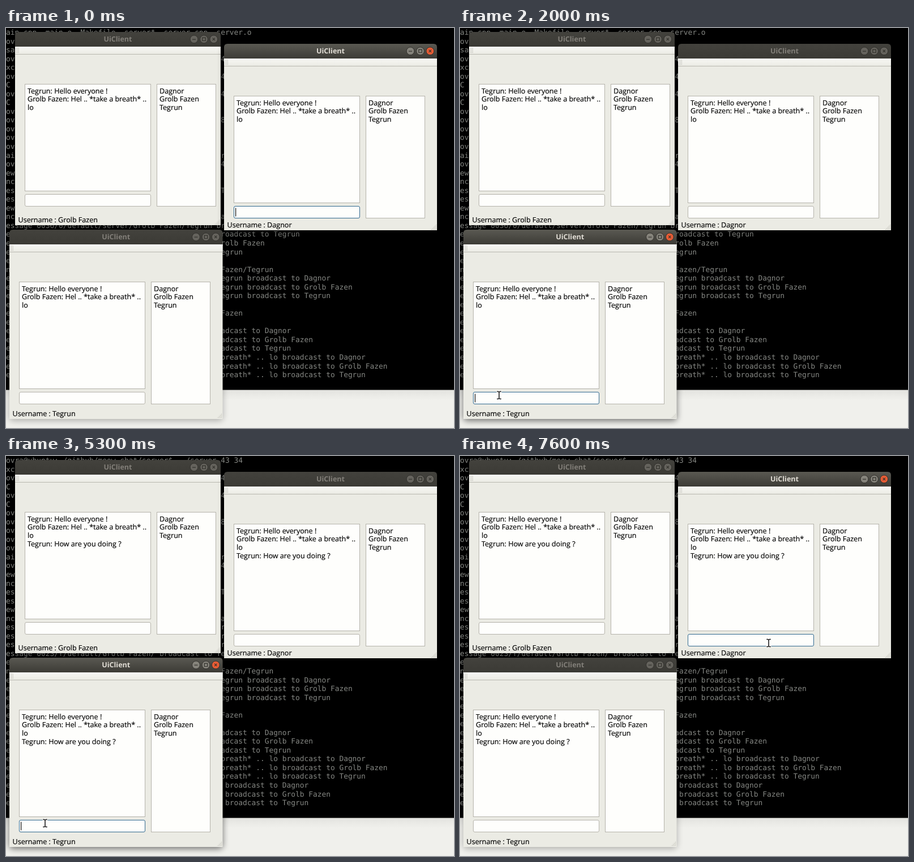
Animation of 791x708 px, one loop 8000 ms. Source, as an HTML page:

```html
<!DOCTYPE html>
<html lang="en">
<head>
<meta charset="utf-8">
<title>Chat clients</title>
<style>
html, body { margin: 0; width: 100%; height: 100%; overflow: hidden; background: #f0f0ec; }
svg { display: block; width: 791px; height: 708px; }
text { white-space: pre; text-rendering: geometricPrecision; }
.ui { font: 12.57px "Open Sans", "Noto Sans", sans-serif; }
.ui text { fill: #0a0a0a; stroke: #0a0a0a; stroke-width: .22; }
.ui .title { font-weight: 700; text-anchor: middle; fill: #827f79; stroke: none; }
.ui .title.active { fill: #e2ded6; }
.term { font: 12.87px "DejaVu Sans Mono", monospace; fill: #858783; }
.box { fill: #fefefc; stroke: #b5b3ab; }
</style>
</head>
<body>
<svg id="stage" viewBox="0 0 791 708">
  <defs>
    <linearGradient id="on" x2="0" y2="1"><stop stop-color="#5a5952"/><stop offset="1" stop-color="#3c3b36"/></linearGradient>
    <linearGradient id="off" x2="0" y2="1"><stop stop-color="#43423d"/><stop offset="1" stop-color="#3b3a35"/></linearGradient>
    <linearGradient id="bar" x2="0" y2="1"><stop stop-color="#f8f8f5"/><stop offset="1" stop-color="#ebebe4"/></linearGradient>
    <linearGradient id="edge" x2="0" y2="1"><stop stop-color="#e3e3df"/><stop offset="1" stop-color="#f0f0ec"/></linearGradient>
    <filter id="blur" x="-15%" y="-15%" width="130%" height="130%"><feGaussianBlur stdDeviation="6"/></filter>
    <pattern id="dots" width="2" height="2" patternUnits="userSpaceOnUse"><rect width="1" height="1" fill="#b9b8b0"/></pattern>
  </defs>
  <rect width="791" height="708" fill="#f0f0ec"/>
  <rect y="640" width="791" height="18" fill="url(#edge)"/>
  <rect width="791" height="640.6" fill="#000"/>
</svg>
<script>
const LOOP = 8000, CELL = 49, ROWS = 40;
const A = 'Tegrun', B = 'Grolb Fazen', C = 'Dagnor', USERS = [C, B, A];
const CHAT = [A + ': Hello everyone !', B + ': Hel .. *take a breath* ..', 'lo', A + ': How are you doing ?'];
const stage = document.getElementById('stage');

function el(parent, tag, attrs = {}, content) {
  const node = document.createElementNS('http://www.w3.org/2000/svg', tag);
  for (const k in attrs) node.setAttribute(k, attrs[k]);
  if (content !== undefined) node.textContent = content;
  parent.appendChild(node);
  return node;
}
const show = (node, on) => node.setAttribute('visibility', on ? 'visible' : 'hidden');

// Terminal log: start of the row, then what follows column 49
const prompt = 'ovra@ubuntu:~/github/meow-chat/server$ ';
const files = 'ain.cpp  main.o  Makefile  server*  server.cpp  server.o';
const run = [prompt + ' ./server', '43 34'];
const toAll = head => USERS.map(u => ['essage', head + 'broadcast to ' + u]);
const log = [
  [files, ''], [prompt, ''], ['sage: server', ''], run, ['xception', ''], run,
  ['C', ''], run, ['C', ''], [prompt, ''], [prompt, '8'], [prompt, ''], [prompt, ''], [prompt, ''],
  ['ain.cpp', 'r'], run, ['ewUser', ''], ['nce', ''], ['essage', A], ['essage', ''],
  ['ewUser', ''], ['nce', 'a'],
  [`essage 0036/0/default/server/${B}/${A} b`, 'roadcast to ' + C],
  ['essage', 'roadcast to ' + A], ['essage', B.slice(1)],
  [`essage 0023/f/default/${B}/ broadcast to ${A[0]}`, A.slice(1)],
  ['essage', ''], ['newUser', B.slice(6) + '/' + A],
  ...toAll(A.slice(1) + ' '),
  ['essage', ''], ['essage', B.slice(6)], ['essage', ''],
  ...USERS.map(u => ['essage', 'adcast to ' + u]),
  ...toAll('breath* .. lo '), ...toAll(' ')
].map(([a, b]) => a.padEnd(CELL) + b);
const term = el(stage, 'g', { class: 'term' });
const rows = Array.from({ length: ROWS }, (_, i) => el(term, 'text', { x: 0, y: 12 + 15.54 * i }));
let shift = -1;
function scrollTo(n) {
  if (n === shift) return;
  shift = n;
  rows.forEach((r, i) => r.textContent = log[i + n]);
}

function makeWindow(x, y, w, h, user) {
  const shadow = el(stage, 'rect', { x, y: y + 3, width: w, height: h, rx: 5, filter: 'url(#blur)' });
  const g = el(stage, 'g', { transform: `translate(${x} ${y})`, class: 'ui' });
  const label = (tx, ty, s) => el(g, 'text', { x: tx, y: ty }, s);
  const box = (bx, by, bw, bh, rx) =>
    el(g, 'rect', { x: bx, y: by, width: bw, height: bh, rx, class: 'box' });

  el(g, 'rect', { y: 20, width: w, height: h - 20, fill: '#ebebe4' });
  const bar = el(g, 'path', { d: `M0 26V6Q0 0 6 0H${w - 6}Q${w} 0 ${w} 6V26Z` });
  const title = el(g, 'text', { x: w / 2, y: 17, class: 'title' }, 'UiClient');
  const buttons = [47, 29.5, 12.2].map((d, i) => {
    const b = el(g, 'g', { transform: `translate(${w - d} 12.8)` });
    const disc = el(b, 'circle', { r: 6.9, stroke: '#32312d' });
    el(b, 'path', {
      d: ['M-3 .3H3', 'M-2.7 -2.7H2.7V2.7H-2.7Z', 'M-2.1 -2.1L2.1 2.1M2.1 -2.1L-2.1 2.1'][i],
      fill: 'none', stroke: '#31302b', 'stroke-width': 1.2
    });
    return disc;
  });

  el(g, 'rect', { y: 26, width: w, height: 13, fill: 'url(#bar)' });
  el(g, 'rect', { y: 39, width: w, height: 1, fill: '#b9b8b0' });
  el(g, 'rect', { x: 2, y: 28, width: 5, height: 10, fill: 'url(#dots)' });
  el(g, 'path', { d: `M${w - 1} ${h - 11}V${h - 1}H${w - 11}Z`, fill: 'url(#dots)' });

  box(17.5, 92.5, 222, 189, 0);
  box(250.5, 92.5, 104, 216, 0);
  const input = box(17.5, 287.5, 222, 21, 2.5);
  const lines = CHAT.map((s, i) => label(22, 108.8 + 14.6 * i, s));
  USERS.forEach((s, i) => label(255, 108.8 + 14.6 * i, s));
  label(5.5, h - 5.2, 'Username : ' + user);
  const typed = label(20, 302.5, '');
  const caret = el(g, 'rect', { y: 290.5, width: 1.2, height: 15, fill: '#111' });

  return (active, focus, blink, text, sent) => {
    shadow.setAttribute('opacity', focus ? .55 : .28);
    bar.setAttribute('fill', active ? 'url(#on)' : 'url(#off)');
    title.classList.toggle('active', active);
    buttons.forEach((b, i) => b.setAttribute('fill', !active ? '#65635d' : i === 2 ? '#e65c35' : '#85837b'));
    input.style.stroke = focus ? '#31698f' : '';
    if (typed.textContent !== text) typed.textContent = text;
    show(caret, focus && blink);
    caret.setAttribute('x', 20 + (text ? typed.getComputedTextLength() : 0));
    show(lines[3], sent);
  };
}
const windows = [
  makeWindow(16, 7, 363, 342, B),
  makeWindow(385, 28, 376, 330, C),
  makeWindow(6, 357, 376.5, 335, A)
];

const beam = 'M-3 -6.5H-1.4L0 -5.5L1.4 -6.5H3M0 -5.5V5.5M-3 6.5H-1.4L0 5.5L1.4 6.5H3';
const pointer = el(stage, 'g', { fill: 'none', 'stroke-linecap': 'square' });
el(pointer, 'path', { d: beam, stroke: '#fff', 'stroke-width': 3 });
el(pointer, 'path', { d: beam, stroke: '#111', 'stroke-width': 1.5 });

// Value of the last [time, value] step reached
const at = (steps, t) => steps.reduce((v, s) => t >= s[0] ? s[1] : v, steps[0][1]);
const FOCUS = [[0, 1], [200, 0], [600, 2], [7000, 1]];
const ACTIVE = [[0, 1], [300, 0], [700, 2], [7100, 1]];
const BLINK = [[0, 1], [1200, 0], [1800, 1], [2300, 0], [2900, 1], [5900, 0], [6400, 1], [7600, 0]];
const PHRASE = 'How are you doing ? ';
const KEYS = [[0, 0], [3000, 1], [3200, 2], [3300, 3], [3400, 4], [3600, 6], [3700, 7], [3900, 9],
  [4100, 11], [4200, 12], [4400, 13], [4500, 15], [4700, 16], [4800, 17], [4900, 19], [5000, 20], [5200, 0]];
const PATH = [[1200, 92, 307], [1800, 69, 682], [1900, 69, 682], [2000, 69, 650], [6300, 69, 650],
  [6800, 540, 349], [6900, 540, 349], [7000, 560, 328], [7300, 560, 328], [7600, 545, 331], [LOOP, 545, 331]];

function pointerAt(t) {
  const i = Math.max(1, PATH.findIndex(p => p[0] >= t));
  const [t0, x0, y0] = PATH[i - 1], [t1, x1, y1] = PATH[i];
  const u = (t - t0) / (t1 - t0), k = u * u * (3 - 2 * u);
  return [x0 + (x1 - x0) * k, y0 + (y1 - y0) * k];
}

function draw(ms) {
  const t = Math.floor(ms % LOOP / 100) * 100;
  scrollTo(t >= 5200 ? 3 : 0);
  const text = PHRASE.slice(0, at(KEYS, t));
  windows.forEach((update, i) =>
    update(at(ACTIVE, t) === i, at(FOCUS, t) === i, at(BLINK, t), i === 2 ? text : '', t >= 5300));
  show(pointer, t >= 1200);
  if (t >= 1200) pointer.setAttribute('transform', `translate(${pointerAt(t)})`);
}

const start = performance.now();
function tick() {
  draw(performance.now() - start);
  requestAnimationFrame(tick);
}
tick();
</script>
</body>
</html>
```
